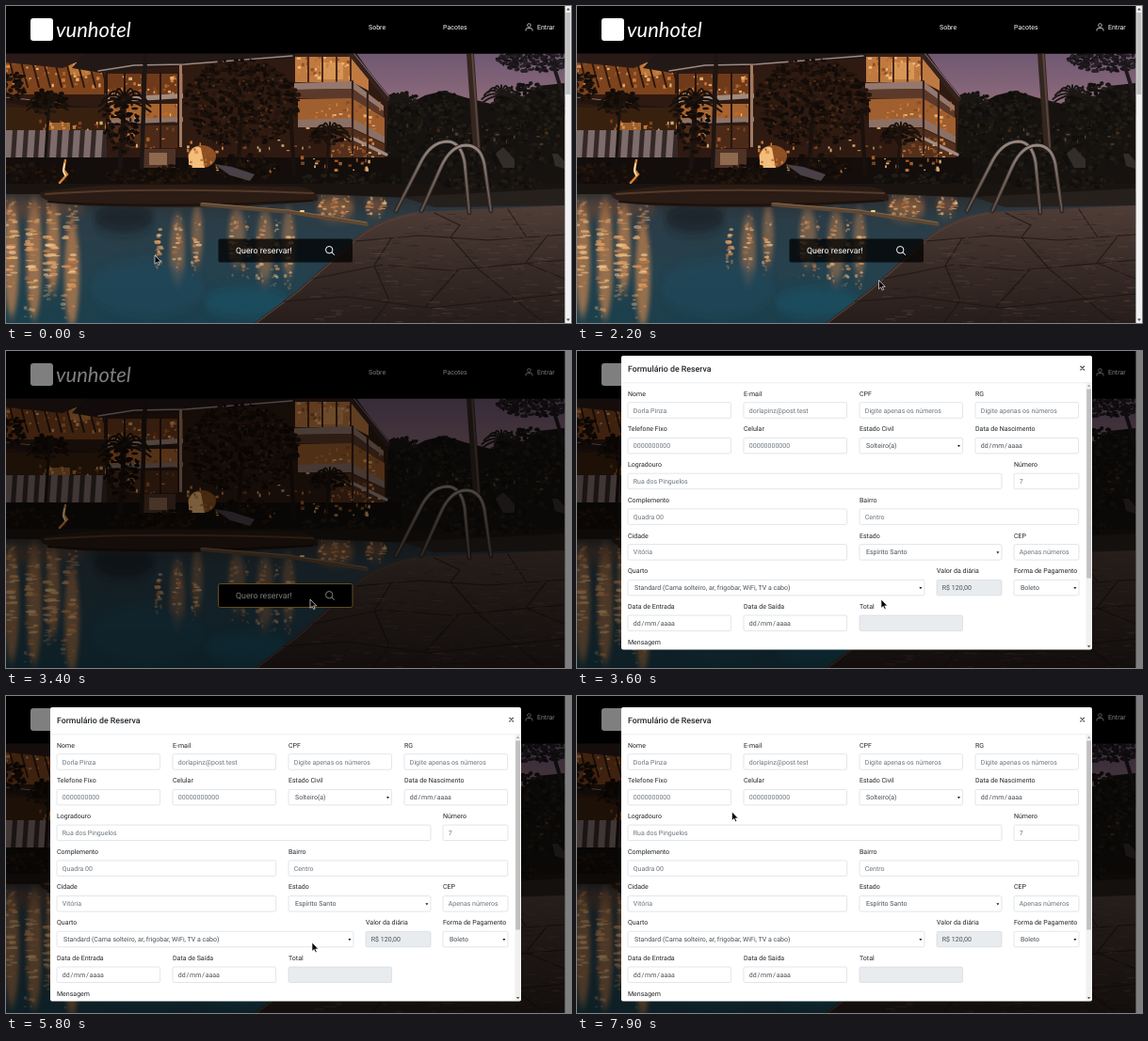
An HTML page for the animation above (8 s loop, 600x337 px).

```html
<!DOCTYPE html>
<html lang="pt-BR">
<head>
<meta charset="utf-8">
<title>Reserva de hotel</title>
<style>
html,body{margin:0;width:100%;height:100%;overflow:hidden;background:#000}
svg{display:block;width:100vw;height:100vh}
text{font-family:Roboto,"Liberation Sans",sans-serif;font-size:7.03px;text-rendering:geometricPrecision}
.nav{fill:#fff}
.label{fill:#212529}
.hint{fill:#6c757d}
.value{fill:#495057}
</style>
</head>
<body>
<svg viewBox="0 0 600 337" preserveAspectRatio="none">
  <defs>
    <linearGradient id="sky" x2="0" y2="1"><stop stop-color="#6f5872"/><stop offset=".35" stop-color="#8d6a7b"/><stop offset="1" stop-color="#9a6f74"/></linearGradient>
    <linearGradient id="pool" x2="0" y2="1"><stop stop-color="#2b2d30"/><stop offset=".2" stop-color="#2b3d47"/><stop offset=".6" stop-color="#25414e"/><stop offset="1" stop-color="#1b3f4c"/></linearGradient>
    <linearGradient id="deck" x2="0" y2="1"><stop stop-color="#4f3d37"/><stop offset=".4" stop-color="#3d2f2a"/><stop offset="1" stop-color="#271d1a"/></linearGradient>
    <linearGradient id="rail" x2="0" y2="1"><stop stop-color="#8d817b"/><stop offset=".5" stop-color="#594c46"/><stop offset="1" stop-color="#40342f"/></linearGradient>
    <filter id="soft" x="-50%" y="-20%" width="200%" height="140%"><feGaussianBlur stdDeviation="2.2 6"/></filter>
    <filter id="haze"><feGaussianBlur stdDeviation=".6"/></filter>
    <clipPath id="photoClip"><path d="M0 50.500H593.500V337H0Z"/></clipPath>
    <clipPath id="modalClip"><rect x="47" y="12" width="500" height="312.500" rx="2"/></clipPath>
  </defs>
  <rect width="600" height="337" fill="#000"/>
  <g id="photo" clip-path="url(#photoClip)"></g>
  <g id="header"></g>
  <g id="button">
    <rect id="buttonBox" x="225.500" y="247.500" width="142.500" height="25" rx="2"/>
    <text x="244" y="262.700" class="nav" style="font-size:8.8px">Quero reservar!</text>
    <path d="M346 262l2.800 2.800" stroke="#fff"/><circle cx="343.200" cy="259.200" r="3.700" fill="none" stroke="#fff"/>
  </g>
  <g id="pageScroll"></g>
  <rect id="gutter" x="593.500" width="6.500" height="337" fill="#fff"/>
  <rect id="backdrop" width="600" height="337"/>
  <g id="modal"></g>
  <g id="cursor" stroke="#fff" stroke-width=".65" stroke-linejoin="round">
    <path id="arrow" d="M0 0V9.300L2.200 7.400L3.700 10.600L5.200 9.900L3.700 6.900H6.700Z"/>
    <path id="hand" d="M-1 0Q0-1 1 0V4L6 5Q7 5.300 6.700 7L5.700 10.500H.5L-3 6.200Q-2.500 5-1 6.300Z" fill="#151515"/>
  </g>
</svg>
<script>
const LOOP = 8000;
const $ = id => document.getElementById(id);
let seed = 17;
const rnd = () => (seed = seed * 16807 % 2147483647) / 2147483647;
const between = (a, b) => a + (b - a) * rnd();
const pick = list => list[Math.floor(rnd() * list.length)];
const repeat = (n, make) => Array.from({length: n}, (_, i) => make(i)).join('');

const rect = (x, y, w, h, fill, extra = '') =>
  `<rect x="${x}" y="${y}" width="${w}" height="${h}" fill="${fill}" ${extra}/>`;
const shape = (d, fill, extra = '') => `<path d="${d}" fill="${fill}" ${extra}/>`;
const line = (d, stroke, width, extra = '') =>
  `<path d="${d}" fill="none" stroke="${stroke}" stroke-width="${width}" stroke-linecap="round" ${extra}/>`;
const label = (x, y, str, cls, extra = '') => `<text x="${x}" y="${y}" class="${cls}" ${extra}>${str}</text>`;
const dot = (x, y, rx, ry, fill, opacity = 1) =>
  `<ellipse cx="${x.toFixed(1)}" cy="${y.toFixed(1)}" rx="${rx.toFixed(1)}" ry="${ry.toFixed(1)}" fill="${fill}" opacity="${opacity}"/>`;

const foliage = (cx, cy, rx, ry, n, colors, leaf = 3.5) => repeat(n, () => {
  const a = rnd() * 2 * Math.PI, r = Math.sqrt(rnd());
  return dot(cx + rx * r * Math.cos(a), cy + ry * r * Math.sin(a), between(1.2, leaf), between(1, leaf * .7), pick(colors));
});
const lamps = (x0, y0, x1, y1, n, opacity = .85) => repeat(n, () =>
  rect(between(x0, x1).toFixed(1), between(y0, y1).toFixed(1), between(1, 4).toFixed(1),
    between(1, 4).toFixed(1), pick(['#e08b42', '#c06a2c', '#f7c482', '#8c4a22']), `opacity="${opacity}"`));
const frond = (x, y, size, color) => repeat(11, i => {
  const a = Math.PI * (.95 + i * .11), dx = Math.cos(a) * size, dy = Math.sin(a) * size * .6;
  return line(`M${x} ${y}q${dx * .6} ${dy * 1.3} ${dx} ${dy + size * .35}`, color, 2);
});
// A broken column of light on the water, widest and brightest at its middle.
const ripple = (x, top, bottom, width, n) => repeat(n, () => {
  const p = rnd(), k = Math.sin(Math.PI * p);
  return dot(x + between(-1, 1) * width - p * 4, top + (bottom - top) * p,
    between(.5, 1) * width * (.3 + .7 * k), between(.6, 2), pick(['#e8a768', '#c98450', '#a56c45', '#f2c68e']), (.25 + .45 * k).toFixed(2));
});

function drawPhoto() {
  const warm = ['#150d09', '#1b110b', '#25160d', '#110b08'], green = ['#14120f', '#1a1712', '#221c16', '#100e0c'];
  const building =
    shape('M0 50H372L406 98L403 168L330 180H0Z', '#2f1a11') +
    rect(0, 54, 104, 40, '#7d431c') + lamps(0, 56, 102, 84, 70) + dot(80, 66, 14, 9, '#e79a4d', .6) +
    repeat(10, i => line(`M${2 + i * 12} 52l9 34`, '#2a170f', 1.9)) +
    shape('M0 50H98L60 66L0 60Z', '#2a1a17') +
    shape('M84 50H307V56L190 63L100 71L70 66Z', '#221917') +
    line('M98 69L136 63L190 62L304 53', '#a08a82', 1.3) +
    line('M0 100L64 108L112 112', '#211510', 6) + line('M0 97L64 104', '#8d6d5c', 1) +
    rect(0, 108, 112, 24, '#38200f') + lamps(34, 120, 110, 142, 50) + rect(44, 124, 24, 15, '#dc8a41', 'opacity=".6"') +
    rect(106, 72, 82, 25, '#6f3a1a') + lamps(104, 74, 186, 94, 45) +
    shape('M108 97L188 93V98L108 103Z', '#a18a7e') +
    rect(110, 104, 76, 17, '#a8642f') + lamps(112, 104, 184, 122, 40) +
    shape('M108 121L188 118V123L108 126Z', '#8b746a') +
    rect(114, 127, 70, 24, '#4c2a17') + lamps(118, 128, 184, 150, 24) +
    repeat(5, i => rect(106 + i * 19, 70, 2, 82, '#27160e')) + rect(184, 62, 3, 88, '#a07a62') +
    shape('M307 50H364L385 77V90L368 81H307Z', '#c07a41') + lamps(308, 51, 364, 75, 40) +
    rect(334, 60, 24, 18, '#f0b26a', 'opacity=".5"') +
    repeat(4, i => rect(320 + i * 15, 50, 2, 32, '#4a2817')) + rect(307, 50, 60, 4, '#342019') +
    line('M366 50L405 98', '#33221f', 6) + line('M369 50L406 96', '#8f7477', 1) +
    shape('M306 82L368 80L401 106V112L368 88L306 89Z', '#95786d') +
    shape('M308 89L368 88L401 112V118L368 99L308 98Z', '#5b3a2b') +
    shape('M310 99L367 98L402 119V138L366 121L310 122Z', '#a05f2e') + lamps(315, 101, 396, 130, 50) +
    shape('M310 121L366 119L402 138V146L366 129L310 129Z', '#8c7064') +
    shape('M345 130L366 130L402 147V164L345 166Z', '#54301c') + lamps(345, 134, 398, 160, 34) +
    line('M367 140L404 158', '#a08c84', 3.5) +
    line('M368 80V165M384 92V160', '#352019', 2.2);
  const garden =
    rect(0, 132, 107, 32, '#342827') +
    repeat(9, i => shape(`M${i * 12} 132h7l-2 31h-7z`, '#7e6c6b')) +
    rect(0, 161, 420, 36, '#130e0b') +
    rect(146, 152, 34, 20, '#4f3226') + rect(152, 156, 19, 13, '#8f694e') +
    dot(208, 160, 15, 12, '#b8682b', .7) + shape('M194 172V158Q200 146 207 151L211 172Z', '#f3bd7c') +
    lamps(192, 142, 310, 176, 36) + lamps(310, 148, 385, 176, 30) +
    foliage(250, 103, 61, 47, 650, warm) + foliage(250, 103, 58, 44, 60, ['#4a2a17', '#3b2213'], 2) +
    line('M250 120L246 178M302 110L306 178', '#1a110c', 4) +
    frond(126, 100, 28, '#17100c') + line('M126 98L121 172', '#1b130f', 5) +
    foliage(122, 125, 18, 34, 130, warm) + foliage(180, 178, 26, 10, 50, warm) +
    frond(44, 101, 22, '#19110c') + foliage(46, 102, 20, 14, 75, warm) + line('M46 101L42 160', '#19130e', 3) +
    frond(344, 134, 22, '#1c130d') + foliage(342, 138, 17, 10, 40, warm) + line('M344 129L340 176', '#1b130f', 2.5) +
    foliage(8, 84, 13, 16, 60, warm) + line('M148 50L144 172', '#1e1613', 4.5) +
    foliage(30, 180, 45, 12, 120, warm) + foliage(155, 182, 50, 9, 120, warm) +
    foliage(255, 172, 35, 14, 120, warm) + foliage(370, 184, 60, 6, 110, green) +
    shape('M221 168L240 171L264 179L259 186L238 180Z', '#4a4148') +
    line('M63 164l-2 10l4 5l-8 9', '#d8843c', 2.4) + line('M62 168l-1 8l2 4', '#ffe0a8', 1.8);
  const grove =
    shape('M397 100L412 92L428 104L445 95L465 90L487 97L515 104L528 94L550 96L565 85L593 82V192H400Z', '#15120f') +
    foliage(423, 115, 23, 23, 170, green) + foliage(465, 108, 24, 17, 150, green) +
    foliage(555, 108, 40, 26, 260, green) + foliage(497, 152, 92, 27, 330, green) +
    foliage(562, 58, 40, 12, 230, ['#1d181c', '#282127', '#161315'], 3) +
    frond(526, 94, 21, '#1c1816') + frond(416, 101, 18, '#1a1714') +
    line('M582 65L593 100', '#1e191a', 4) + lamps(410, 125, 590, 148, 26, .25) +
    line('M493 50L500 152', '#33261f', 8) + line('M495 50L502 150', '#5a4541', 2) +
    shape('M520 157l8-7l12 13v9h-12zM580 157l6 0l7 8v8l-10-3z', '#332d2a');
  const water =
    rect(0, 199, 594, 138, 'url(#pool)') +
    '<g filter="url(#soft)">' +
    [[6, 268, 8, 62], [30, 268, 8, 64], [50, 255, 7, 48], [70, 285, 8, 56], [182, 258, 8, 36], [203, 243, 6, 32], [245, 245, 9, 30], [275, 255, 9, 38], [300, 252, 7, 36]]
      .map(([x, y, rx, ry], i) => dot(x, y, rx, ry, '#bd8050', i < 4 ? .75 : .5)).join('') +
    dot(350, 214, 20, 12, '#a5683c', .7) + dot(392, 212, 10, 10, '#8d5a3a', .6) +
    dot(25, 215, 60, 10, '#7a5038', .5) + dot(125, 225, 32, 16, '#1d2426', .8) + dot(150, 300, 60, 30, '#22485a', .6) +
    dot(255, 315, 45, 16, '#1d5062', .8) + '</g>' +
    [6, 30, 50, 70].map((x, i) => ripple(x, 207, 312 + i % 2 * 20, 6, 55)).join('') +
    [165, 184, 204, 243, 258, 273, 288, 303].map((x, i) => ripple(x, 222, 280 + i * 3, 3.5, 26)).join('') +
    [338, 350, 362, 388, 402].map(x => ripple(x, 202, 226, 3, 14)).join('');
  const poolside =
    shape('M0 189H593V204H430L330 200L0 200Z', '#1a1410') +
    shape('M37 198Q90 188 180 190L312 192Q333 196 331 207Q250 216 112 213Q30 212 37 198Z', '#2a1b14') +
    line('M42 200Q145 192 326 199', '#543a29', 2) + line('M45 208Q150 216 325 207', '#1a110d', 2) +
    shape('M420 203L593 194V212L455 214Z', '#26201d') + foliage(510, 188, 58, 7, 130, green) +
    line('M208 211L300 219L383 232', '#5f4733', 4) + line('M208 209.500L300 217L383 230', '#8a6a48', 1) +
    line('M313 218h3', '#ffd18c', 2);
  const deck =
    shape('M264 337L310 302L365 252Q391 226 435 219L593 212V337Z', 'url(#deck)') +
    line('M266 337L311 303L367 253Q392 229 435 221', '#54413a', 1.2) +
    line('M371 250L440 244L512 249L593 243M326 290L400 275L470 281L593 270M295 314L360 309L450 321L593 306M455 220L482 233L472 246L502 280L570 336M533 216L553 246M409 247L391 276L407 313L389 337M480 281L445 320M575 244L552 273L593 290', '#1c1411', 1.2, 'opacity=".8"') +
    repeat(330, () => {
      const y = between(220, 336), x = between(430 - (y - 220) * 1.25, 593);
      return rect(x.toFixed(1), y.toFixed(1), between(3, 14).toFixed(1), between(.6, 1.4).toFixed(1), pick(['#6b564c', '#1d1613', '#4f3f37']), 'opacity=".32"');
    }) +
    ['M414 218L439 169Q450 145 468 144Q483 144 487 166L492 220', 'M441 218L462 171Q472 149 488 148Q504 148 508 168L515 218']
      .map(d => line(d, '#241b18', 4.6) + line(d, 'url(#rail)', 3.2) + line(d, '#b5a89f', .7, 'opacity=".6"')).join('');
  $('photo').innerHTML = rect(0, 50, 594, 150, 'url(#sky)') +
    `<g filter="url(#haze)">${grove + building + garden + water + poolside + deck}</g>`;
}

function drawHeader() {
  $('header').innerHTML = rect(0, 0, 594, 50.5, '#000') + rect(26, 13, 24, 24, '#fff', 'rx="3"') +
    label(53, 32.5, 'vunhotel', 'nav', 'style="font:italic 22px Lato,sans-serif"') +
    label(385, 24.8, 'Sobre', 'nav') + label(464, 24.8, 'Pacotes', 'nav') + label(564, 24.8, 'Entrar', 'nav') +
    line('M552 26.200V25.200Q552 23.500 554 23.500H557Q559 23.500 559 25.200V26.200', '#fff', .7) +
    '<circle cx="555.500" cy="20.500" r="1.800" fill="none" stroke="#fff" stroke-width=".7"/>';
  $('pageScroll').innerHTML = rect(593.5, 0, 6.5, 337, '#f1f1f1') + rect(594.3, 7, 5, 87, '#c1c1c1') +
    shape('M595 4.500h4l-2-2.500zM595 332.500h4l-2 2.500z', '#505050');
}

function field(x, y, w, title, text, kind = 'hint') {
  const fill = kind === 'locked' ? '#e9ecef' : '#fff';
  const cls = kind === 'hint' ? 'hint' : 'value';
  const gap = part => `<tspan dx=".700">${part}</tspan>`;
  const content = kind === 'date' ? 'dd' + ['/', 'mm', '/', 'aaaa'].map(gap).join('') : text;
  const caret = kind === 'select' ? shape(`M${x + w - 5.6} ${y + 17.2}h3l-1.500 2.300z`, '#222') : '';
  return label(x, y + 2.5, title, 'label') +
    rect(x, y + 9.6, w, 16.5, fill, 'rx="1.700" stroke="#ced4da" stroke-width=".6"') +
    label(x + (kind === 'select' ? 7 : 5.8), y + 20.4, content, cls) + caret;
}

function drawModal() {
  const A = 54, B = 177, C = 300, D = 423, E = 464, S = 109.6, M = 232.7, N = 69;
  const rows = [
    [[A, S, 'Nome', 'Dorla Pinza'], [B, S, 'E-mail', 'dorlapinz@post.test'], [C, S, 'CPF', 'Digite apenas os números'], [D, S, 'RG', 'Digite apenas os números']],
    [[A, S, 'Telefone Fixo', '0000000000'], [B, S, 'Celular', '00000000000'], [C, S, 'Estado Civil', 'Solteiro(a)', 'select'], [D, S, 'Data de Nascimento', '', 'date']],
    [[A, 397, 'Logradouro', 'Rua dos Pinguelos'], [E, N, 'Número', '7']],
    [[A, M, 'Complemento', 'Quadra 00'], [C, M, 'Bairro', 'Centro']],
    [[A, M, 'Cidade', 'Vitória'], [C, 151, 'Estado', 'Espírito Santo', 'select'], [E, N, 'CEP', 'Apenas números']],
    [[A, 315, 'Quarto', 'Standard (Cama solteiro, ar, frigobar, WiFi, TV a cabo)', 'select'], [382, N, 'Valor da diária', 'R$ 120,00', 'locked'], [E, N, 'Forma de Pagamento', 'Boleto', 'select']],
    [[A, S, 'Data de Entrada', '', 'date'], [B, S, 'Data de Saída', '', 'date'], [C, S, 'Total', '', 'locked']],
    [[A, 479, 'Mensagem', '']]
  ];
  const fields = rows.map((row, i) =>
    row.map(([x, w, ...rest]) => field(x, 52.1 + i * 37.72, w, ...rest)).join('')).join('');
  $('modal').innerHTML = `<g clip-path="url(#modalClip)">${
    rect(47, 12, 500, 313, '#fff') + fields + line('M47 40.800H547', '#dee2e6', .6) +
    label(54, 29.4, 'Formulário de Reserva', 'label', 'style="font-size:8.8px;font-weight:500"') +
    line('M534.800 23.200l3.800 3.800m0-3.800l-3.800 3.800', '#555', 1.2) +
    rect(540.5, 41.1, 6, 283, '#f1f1f1') + rect(541.2, 47.5, 4.8, 201, '#c1c1c1') +
    shape('M542 45h3.200l-1.600-2.200z', '#a3a3a3') + shape('M542 320h3.200l-1.600 2.200z', '#505050')}</g>`;
}

// time, x, y; a trailing 1 glides to the next stop, otherwise the pointer rests.
const stops = [
  [0, 158, 265], [1000, 157, 269], [1400, 155, 273], [1500, 155, 273, 1], [2200, 320.5, 291.5, 1],
  [2800, 323, 264], [5000, 323, 264, 1], [5400, 324, 263], [5800, 325, 262], [6400, 305, 242, 1],
  [6800, 264, 207], [7200, 264, 207, 1], [7500, 196, 149], [7700, 196, 149, 1], [7900, 164.5, 123]
];
const clamp = v => Math.max(0, Math.min(1, v));

function pointerAt(t) {
  const i = stops.findLastIndex(s => s[0] <= t);
  const [t0, x, y, glide] = stops[i];
  if (!glide) return [x, y];
  const [t1, x1, y1] = stops[i + 1];
  const p = (t - t0) / (t1 - t0), k = p * p * (3 - 2 * p);
  return [x + (x1 - x) * k, y + (y1 - y) * k];
}

const show = (id, on) => $(id).setAttribute('display', on ? 'inline' : 'none');

function render(time) {
  const t = Math.floor(time % LOOP / 100) * 100;
  const opened = t >= 3300, [x, y] = pointerAt(t);
  const hover = !opened && x > 225 && x < 368 && y > 247 && y < 273;
  const slide = 1 - Math.pow(1 - clamp((t - 3450) / 300), 1.66);

  $('buttonBox').setAttribute('fill', hover || opened ? '#000' : 'rgba(0,0,0,.75)');
  $('buttonBox').setAttribute('stroke', hover || opened ? '#c99a3f' : 'none');
  show('pageScroll', !opened);
  show('gutter', opened);
  $('backdrop').setAttribute('opacity', clamp((t - 3250) / 150) * .5);
  $('modal').setAttribute('opacity', clamp((t - 3450) / 150));
  $('modal').setAttribute('transform', `translate(0 ${-22 * (1 - slide)})`);
  show('hand', hover);
  show('arrow', !hover);
  $('cursor').setAttribute('transform', `translate(${x} ${y})`);
}

drawPhoto();
drawHeader();
drawModal();
const start = performance.now();
function tick() {
  render(performance.now() - start);
  requestAnimationFrame(tick);
}
tick();
</script>
</body>
</html>
```
